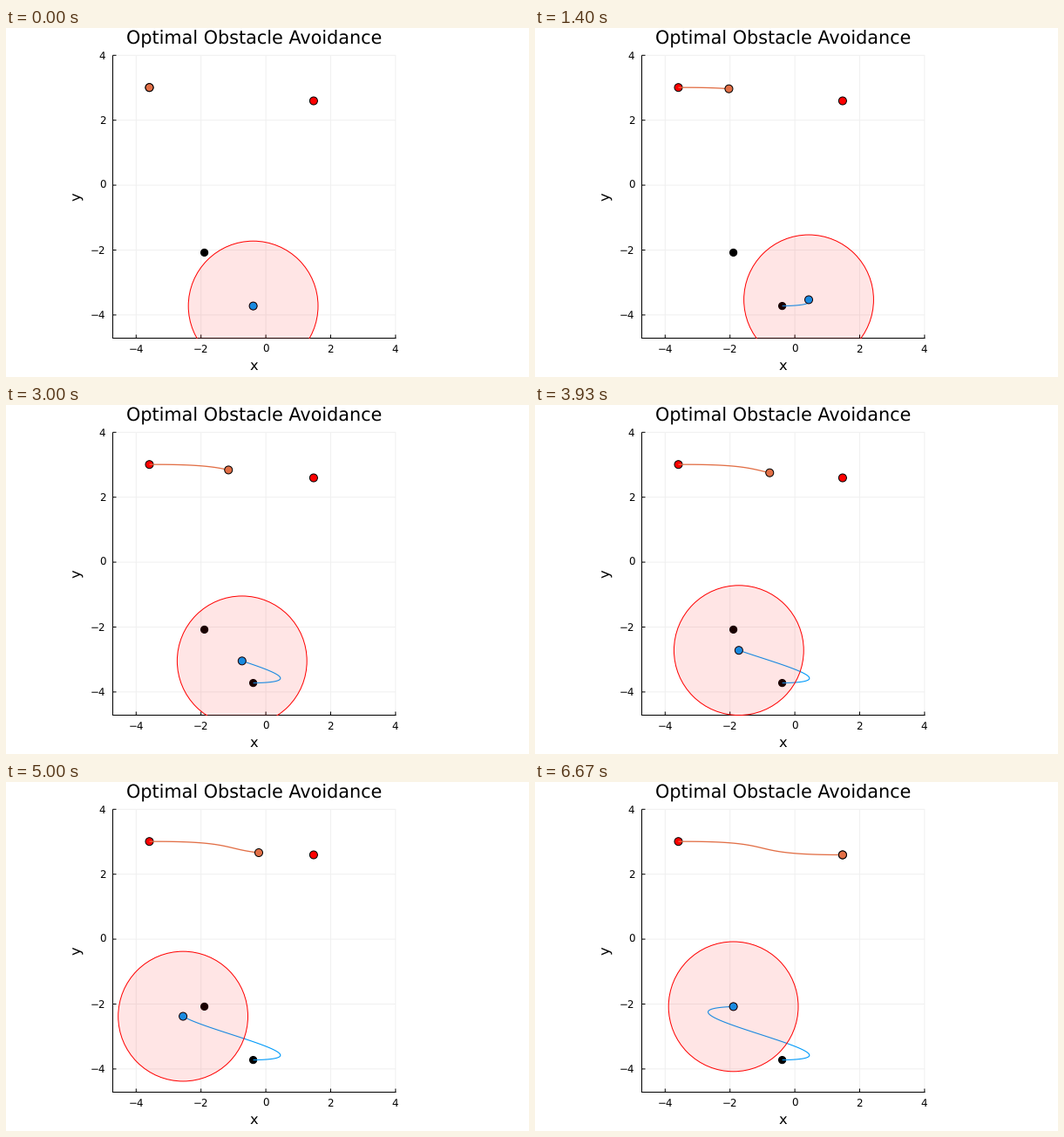
These frames come from a looping animation (600 px wide and 400 px high, 6.74 s). A matplotlib script:

```python
import numpy as np
import matplotlib.pyplot as plt
from matplotlib.animation import FuncAnimation
from matplotlib.patches import Circle, Rectangle

W, H, DPI = 600, 400, 100
STEPS, STEP_MS = 101, 200 / 3       # simulation states, 15 per second
TICK_MS, LOOP_MS = 20, 6740
PT = 72 / DPI                       # points per pixel
UNIT, X0, Y0 = 37.2, 298.1, 180.1   # pixels per data unit, data origin
LEFT, RIGHT, TOP, BOTTOM = 122.5, 447.0, 31.3, 355.5
BLUE, ORANGE = "#009afa", "#e26f46"

plt.rcParams["font.family"] = "DejaVu Sans"
plt.rcParams["text.hinting"] = "none"

fig = plt.figure(figsize=(W / DPI, H / DPI), dpi=DPI, facecolor="white")
ax = fig.add_axes([0, 0, 1, 1])
ax.set_xlim(0, W)
ax.set_ylim(H, 0)
ax.axis("off")


def line(xs, ys, color, width=1.0, z=1):
    return ax.plot(xs, ys, color=color, lw=width * PT, zorder=z,
                   solid_capstyle="butt", snap=False)[0]


def label(x, y, text, size, ha="center", **kw):
    ax.text(x, y, text, fontsize=size * PT, ha=ha, va="baseline", **kw)


def dot(pos, color, z, r=4.5):
    return ax.add_patch(Circle(pos, r, fc=color, ec="black", lw=PT, zorder=z))


def hermite(p0, p1, v0, v1, s):
    """Cubic path with given end points and end velocities."""
    s = s[:, None]
    p0, p1, v0, v1 = map(np.array, (p0, p1, v0, v1))
    ease = s * s * (3 - 2 * s)
    return (p0 + (p1 - p0) * ease + v0 * s * (1 - s) ** 2
            - v1 * s * s * (1 - s))


# Grid, ticks and axes
for v in (-4, -2, 0, 2, 4):
    gx, gy = X0 + v * UNIT, Y0 - v * UNIT
    name = str(v).replace("-", "\u2212")
    line([gx, gx], [TOP, BOTTOM], "#f0f0f0")
    line([LEFT, RIGHT], [gy, gy], "#f0f0f0")
    line([gx, gx], [BOTTOM - 4, BOTTOM], "black", z=2)
    line([LEFT, LEFT + 4], [gy, gy], "black", z=2)
    label(gx - 0.3, 371.8, name, 11.86)
    label(114.3, gy + 4.2, name, 11.86, ha="right")
line([LEFT, LEFT], [TOP, BOTTOM + 0.5], "black", z=2)
line([LEFT - 0.5, RIGHT + 0.5], [BOTTOM, BOTTOM], "black", z=2)

label(284.8, 18.9, "Optimal Obstacle Avoidance", 20.75)
label(284.3, 391.6, "x", 16.3)
label(86, 193, "y", 16.3, rotation=90, rotation_mode="anchor")

# Trajectories
s = np.linspace(0, 1, STEPS)
blue_a, blue_b = (283.6, 318.6), (227.6, 257.4)
orange_a, orange_b = (164.5, 68.2), (352.9, 83.5)
blue = hermite(blue_a, blue_b, (377, -5), (362, -13), s)
orange = hermite(orange_a, orange_b, (375, -2), (363, 0), s)

for end in (blue_a, blue_b):
    dot(end, "black", 4, 4.1)
for end in (orange_a, orange_b):
    dot(end, "red", 4)

blue_line = line([], [], BLUE, 1.1, 5)
orange_line = line([], [], ORANGE, 1.3, 5)
blue_dot = dot(blue_a, BLUE, 6)
orange_dot = dot(orange_a, ORANGE, 6)

# Safety zone, drawn over everything and clipped to the plot area
window = Rectangle((LEFT, TOP), RIGHT - LEFT, BOTTOM - TOP,
                   transform=ax.transData)
zone = ax.add_patch(Circle(blue_a, 2 * UNIT, fc=(1, 0, 0, 0.1),
                           ec="red", lw=PT, zorder=7))
zone.set_clip_path(window)


def draw(i):
    # The state that has begun by the end of this tick
    k = min(int((i + 1) * TICK_MS / STEP_MS + 1e-6), STEPS - 1)
    blue_line.set_data(*blue[:k + 1].T)
    orange_line.set_data(*orange[:k + 1].T)
    blue_dot.center = zone.center = tuple(blue[k])
    orange_dot.center = tuple(orange[k])
    return blue_line, orange_line, blue_dot, orange_dot, zone


anim = FuncAnimation(fig, draw, frames=LOOP_MS // TICK_MS, interval=TICK_MS,
                     repeat=True, repeat_delay=0, blit=False)
plt.show()
```
